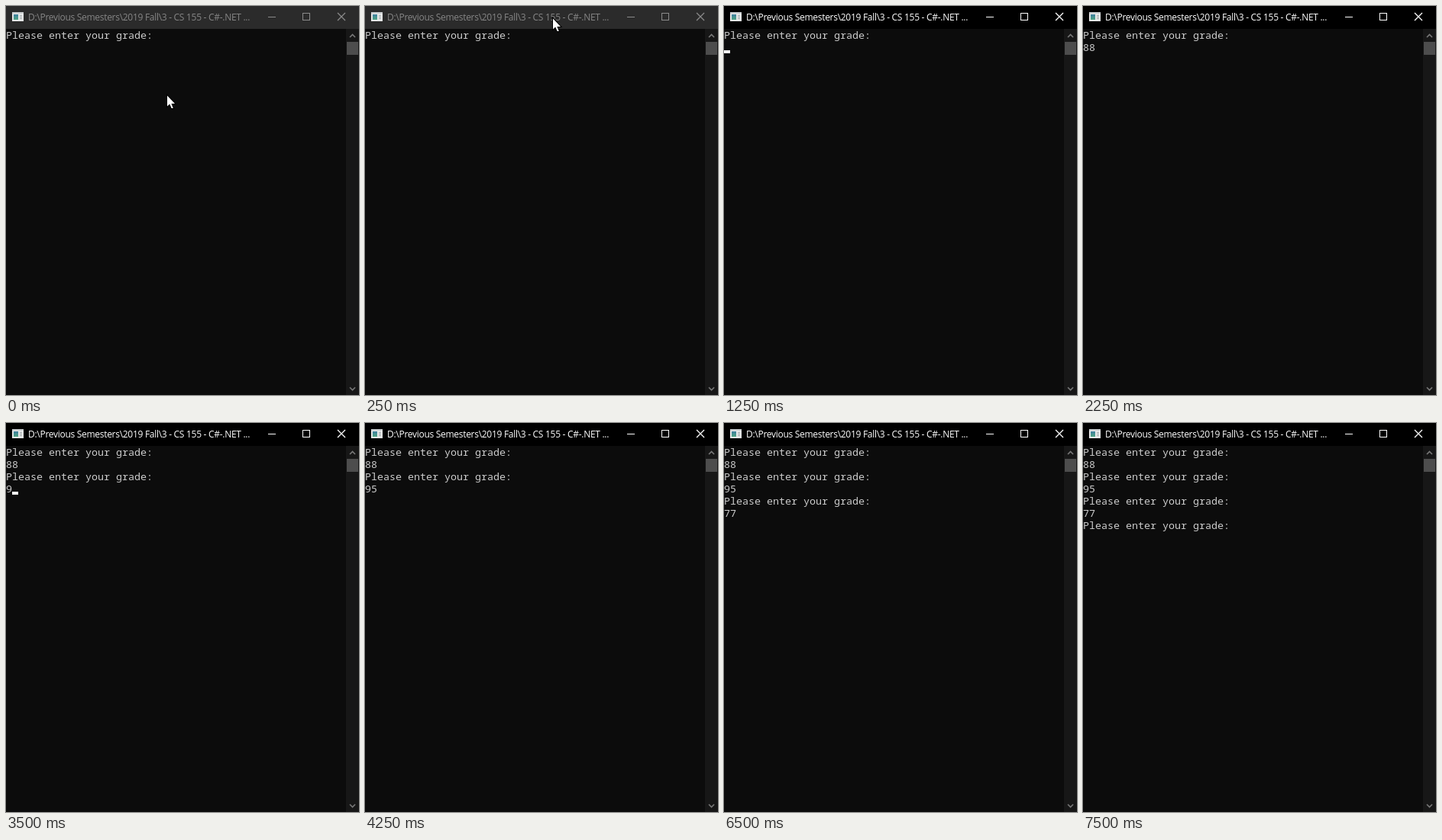
An HTML page for the animation above (8 s loop, 462 px wide and 510 px high).

```html
<!DOCTYPE html>
<html lang="en">
<head>
<meta charset="utf-8">
<title>Grade prompt</title>
<style>
  html, body { margin: 0; width: 100%; height: 100%; overflow: hidden; background: #0c0c0c; }
  svg { display: block; }
  #bar { fill: #2b2b2b; }
  #title { font: 12px "Open Sans", "Noto Sans", sans-serif; letter-spacing: -.29px; fill: #868686; }
  #buttons { fill: none; stroke: #8a8a8a; }
  .active #bar { fill: #000; }
  .active #title { fill: #fff; }
  .active #buttons { stroke: #fff; }
  #console { font: 13.333px "Noto Sans Mono", "Liberation Mono", monospace; fill: #ccc; white-space: pre; }
  #mouse { fill: #fff; stroke: #000; stroke-width: 2; paint-order: stroke; }
</style>
</head>
<body>
<svg id="stage" width="462" height="510" viewBox="0 0 462 510">
  <defs>
    <linearGradient id="pane" x2="0" y2="1">
      <stop stop-color="#3f7fa0"/>
      <stop offset="1" stop-color="#4fa583"/>
    </linearGradient>
  </defs>
  <rect width="462" height="510" fill="#0c0c0c"/>
  <rect id="bar" width="462" height="30"/>

  <g id="icon">
    <rect x="8" y="8" width="15" height="12" fill="#e6e8e8"/>
    <rect x="8" y="8" width="15" height="2" fill="#c9cdcf"/>
    <rect x="10" y="11" width="6" height="7" fill="url(#pane)"/>
    <path d="M18 12.5h3M18 14.5h3M18 16.5h3" stroke="#a5abad"/>
  </g>
  <text id="title" x="29" y="19">D:\Previous Semesters\2019 Fall\3 - CS 155 - C#-.NET ...</text>
  <g id="buttons">
    <path d="M343 14.5h10"/>
    <rect x="388.5" y="9.5" width="9" height="9"/>
    <path d="M434 9l10 10M444 9l-10 10" stroke-width="1.3"/>
  </g>

  <rect x="445" y="30" width="17" height="480" fill="#171717"/>
  <rect x="446" y="47" width="15" height="17" fill="#4d4d4d"/>
  <path d="M450 41l3.5-3.5 3.5 3.5M450 500l3.5 3.5 3.5-3.5" fill="none" stroke="#777" stroke-width="1.6"/>

  <g id="console"></g>
  <rect id="caret" width="8" height="4" fill="#f2f2f2"/>
  <path id="mouse" d="M1 1.5V15.5L4.2 12.4 6.6 18H8.8L6.4 12H11Z"/>
</svg>
<script>
  const LOOP = 8000, TOP = 30, ROW = 16, COL = 8;
  const PROMPT = "Please enter your grade:";
  const GRADES = ["88", "95", "77"];

  // time, prompts shown, digits typed at the last prompt, caret visible
  const typing = [
    [0, 1, 0, false], [1250, 1, 0, true], [1750, 1, 0, false],
    [2000, 1, 1, true], [2250, 1, 2, false],
    [2500, 2, 0, true], [3250, 2, 0, false],
    [3500, 2, 1, true], [3750, 2, 1, false],
    [4000, 2, 2, true], [4250, 2, 2, false],
    [4500, 3, 0, true], [5500, 3, 0, false],
    [5750, 3, 1, true], [6000, 3, 2, true], [6500, 3, 2, false],
    [7000, 4, 0, true], [7500, 4, 0, false]
  ];

  // time, pointer x, y; no position means hidden
  const pointer = [[0, 210, 116], [250, 245, 15], [500, 253, 15], [750, 278, 0], [1000]];
  const FOCUS = 500;

  const $ = id => document.getElementById(id);
  const stage = $("stage"), caret = $("caret"), mouse = $("mouse");
  const show = (el, on) => el.setAttribute("visibility", on ? "visible" : "hidden");
  const stepAt = (steps, t) => steps.findLast(s => s[0] <= t);

  const rows = Array.from({ length: 8 }, (_, i) => {
    const row = document.createElementNS("http://www.w3.org/2000/svg", "text");
    row.setAttribute("x", 0);
    row.setAttribute("y", TOP + ROW * i + 13);
    $("console").append(row);
    return row;
  });

  function drawConsole([, prompts, digits, caretOn]) {
    rows.forEach((row, i) => {
      const n = i >> 1;
      const last = n === prompts - 1;
      let text = "";
      if (n < prompts) {
        text = i % 2 ? (GRADES[n] || "").slice(0, last ? digits : 2) : PROMPT;
      }
      if (row.textContent !== text) row.textContent = text;
    });
    caret.setAttribute("x", digits * COL);
    caret.setAttribute("y", TOP + prompts * 2 * ROW - 4);
    show(caret, caretOn);
  }

  function drawPointer([, x, y]) {
    show(mouse, x !== undefined);
    if (x !== undefined) mouse.setAttribute("transform", `translate(${x} ${y})`);
  }

  const start = performance.now();
  function frame() {
    const t = (performance.now() - start) % LOOP;
    stage.classList.toggle("active", t >= FOCUS);
    drawConsole(stepAt(typing, t));
    drawPointer(stepAt(pointer, t));
    requestAnimationFrame(frame);
  }
  frame();
</script>
</body>
</html>
```
